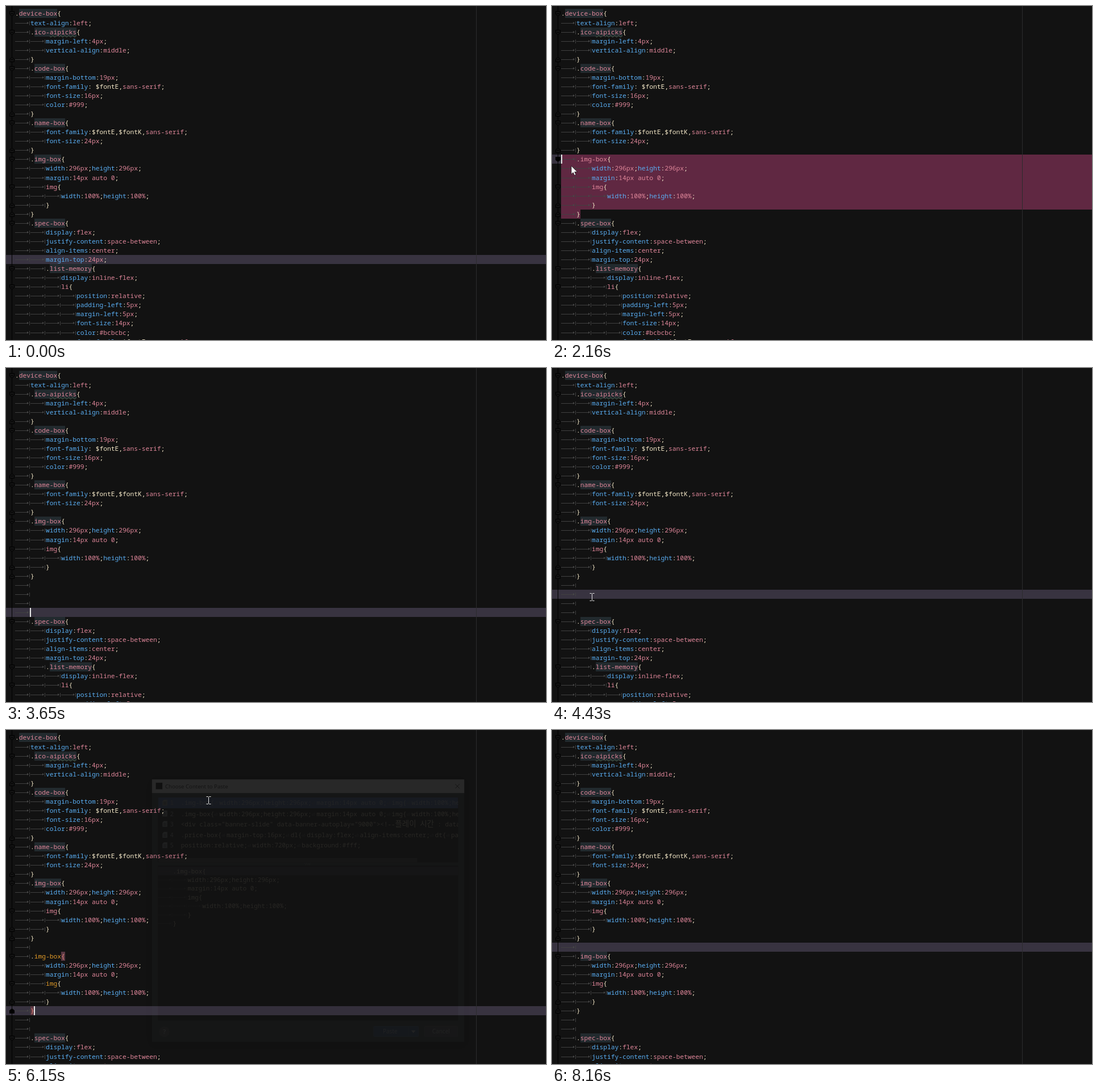
Write an HTML page that moves like this. It is 950x589 px and loops after 8.41 s.

```html
<!DOCTYPE html>
<html lang="en">
<head>
<meta charset="utf-8">
<title>Paste from history</title>
<style>
html, body { margin: 0; width: 100%; height: 100%; overflow: hidden; background: #121212; }
#stage { position: relative; width: 950px; height: 589px; overflow: hidden; background: #121212;
  font: 11.25px/16px "Noto Sans Mono", "DejaVu Sans Mono", monospace; color: #f4e8c8; }
#stage div, #stage svg { position: absolute; }
.row { left: 16px; height: 16px; white-space: pre; }
.band { left: 0; width: 950px; height: 16px; background: #383340; }
.sel { left: 16px; background: #602842; }
.caret { width: 2px; height: 16px; background: #e8e8e8; }
.rail { left: 10px; top: 0; width: 1px; height: 589px; background: #000; }
.guide { left: 827px; top: 0; width: 1px; height: 589px; background: #2c2c2d; }
.fold { left: 5px; width: 11px; height: 11px; fill: #121212; stroke: #000; }
.fold.on { fill: #000; }
.tab { display: inline-block; position: relative; width: 27px; height: 16px; vertical-align: top;
  background: linear-gradient(#404040, #404040) 0 8px / 23px 1px no-repeat,
    linear-gradient(#404040, #404040) 25px 5px / 1px 7px no-repeat; }
.tab::after { content: ""; position: absolute; left: 21px; top: 6px;
  border: solid transparent; border-width: 2.5px 0 2.5px 3px; border-left-color: #484848; }
.prop { color: #5aaef2; }
.val, .name { color: #de8699; }
.box { display: inline-block; height: 16px; vertical-align: top; background: #222a2e; }
.typo { text-decoration: underline wavy #4d6650 1px; text-underline-offset: 1px; }
.new { color: #e09a28; }
.brace { display: inline-block; height: 16px; vertical-align: top; background: #593842; color: #ee8a80; }

#dialog { left: 246px; top: 78px; width: 571px; height: 481px; background: #3c3f41;
  box-shadow: 0 4px 14px rgba(0, 0, 0, .55); }
#dialog .title { left: 0; top: 0; width: 571px; height: 25px; background: #fff; color: #111;
  font: 10px/25px "Open Sans", "Noto Sans", sans-serif; text-indent: 24px; }
.badge { left: 7px; top: 6px; width: 12px; height: 12px; background: #000; }
.list, .preview { left: 11px; width: 549px; overflow: hidden; background: #121212; }
.list { top: 33px; height: 119px; }
.preview { top: 158px; height: 284px; }
.item { left: 0; width: 549px; height: 19.5px; line-height: 19.5px; white-space: pre; }
.item.on { background: #4b6eaf; color: #c4cbd8; }
.item .num { left: 22px; color: #a4a8ac; }
.item .text { left: 42px; }
.item svg { left: 8px; top: 4px; }
.ret { display: inline-block; width: 9.2px; font: 8px/16px "DejaVu Sans", sans-serif; color: #858585; }
.ko { font: 14px/16px "Noto Sans CJK KR", "Noto Sans CJK", sans-serif; }
.bar { left: 1px; top: 111px; width: 473px; height: 8px; background: #414141; }
.grip { left: 279px; top: 153px; width: 12px; height: 4px;
  background: repeating-linear-gradient(115deg, #777 0 1px, transparent 1px 3px); }
.preview .band { top: 2px; width: 549px; }
.preview .row { left: 0; }
.help, .btn { box-sizing: border-box; font: 10.5px/19px "Open Sans", "Noto Sans", sans-serif; color: #bfc3c6; text-align: center; }
.help { left: 13px; top: 453px; width: 19px; height: 19px; border-radius: 50%; background: #55595c; font-size: 12px; font-weight: 600; }
.btn { top: 452px; height: 20px; border: 1px solid #5e6162; border-radius: 2px; background: #4c5052; }
.btn.main { left: 405px; width: 83px; border-color: #4c708c; background: #365880; text-indent: -22px; }
.btn.main::before { content: ""; position: absolute; left: 62px; top: 0; width: 1px; height: 18px; background: #4c708c; }
.btn.main::after { content: ""; position: absolute; left: 68px; top: 7px;
  border: solid transparent; border-width: 5px 4.5px 0; border-top-color: #bfc3c6; }
#arrow, #beam { overflow: visible; left: 0; top: 0; }
</style>
</head>
<body>
<div id="stage">
  <div id="code"></div>
  <div class="guide"></div>
  <div id="dialog">
    <div class="title">Choose Content to Paste</div>
    <div class="badge"></div>
    <svg style="left:554px;top:8px" width="9" height="9" stroke="#222" fill="none"><path d="M.5 .5l8 8M8.5 .5l-8 8"/></svg>
    <div class="list" id="list"></div>
    <div class="grip"></div>
    <div class="preview" id="preview"><div class="band"></div></div>
    <div class="help">?</div>
    <div class="btn main">Paste</div>
    <div class="btn" style="left:498px;width:61px">Cancel</div>
  </div>
  <svg id="arrow" width="12" height="18"><path d="M0 0V14.5L3.3 11.5L5.6 16.6L8 15.5L5.7 10.6H10.4Z" fill="#fff" stroke="#111" stroke-width=".7"/></svg>
  <svg id="beam" width="9" height="14" fill="none"><path d="M.5 .5h3l1 1l1-1h3M4.5 1.5v11M.5 13.5h3l1-1l1 1h3" stroke="#e4e4e4"/></svg>
</div>
<script>
const LOOP = 8410, CHAR = 6.75, LEFT = 16;
const $ = id => document.getElementById(id);
const rowTop = i => Math.round(5.45 + 16.06 * i);

// One leading space is one tab.
const imgBox = ` .img-box{
  width:296px;height:296px;
  margin:14px auto 0;
  img{
   width:100%;height:100%;
  }
 }`.split("\n");
const head = `.device-box{
 text-align:left;
 .ico-aipicks{
  margin-left:4px;
  vertical-align:middle;
 }
 .code-box{
  margin-bottom:19px;
  font-family: $fontE,sans-serif;
  font-size:16px;
  color:#999;
 }
 .name-box{
  font-family:$fontE,$fontK,sans-serif;
  font-size:24px;
 }`.split("\n").concat(imgBox);
const tail = ` .spec-box{
  display:flex;
  justify-content:space-between;
  align-items:center;
  margin-top:24px;
  .list-memory{
   display:inline-flex;
   li{
    position:relative;
    padding-left:5px;
    margin-left:5px;
    font-size:14px;
    color:#bcbcbc;
    font-family:$fontE,sans-serif;`.split("\n");

const span = (cls, text) => `<span class="${cls}">${text}</span>`;
const tabs = line => span("tab", "").repeat(line.search(/\S|$/));

function paint(line, { plain, fresh, lit }) {
  const text = line.trimStart();
  const brace = c => lit ? span("brace", c) : c;
  let html;
  if (text.endsWith("{")) {
    const [, dot, name] = text.match(/(\.?)(.*)\{/);
    const cls = fresh ? "new" : dot && !plain ? "name box" : "name";
    html = dot + span(cls, name.replace("aipicks", span("typo", "aipicks"))) + brace("{");
  } else if (text === "}") {
    html = brace("}");
  } else {
    html = text.replace(/([\w-]+):([^;]*);/g, (m, prop, value) =>
      span("prop", prop) + ":" + value.replace(/(^|[ ,])([^$ ,][^,]*)/g, (n, sep, v) => sep + span("val", v)) + ";");
  }
  return tabs(line) + html;
}

function foldMark(line, i, on) {
  const end = line.slice(-1);
  if (end !== "{" && end !== "}") return "";
  const d = end === "{" ? "M1.5 1.5h8v5l-4 3l-4-3z" : "M1.5 9.5h8v-5l-4-3l-4 3z";
  return `<svg class="fold${on ? " on" : ""}" style="top:${rowTop(i) + 3}px"><path d="${d}M3.5 5.5h4"/></svg>`;
}

// Each step changes part of the state: row and col of the caret, top row of
// the selection, matched braces, blank lines, pasted block, dialog look.
const steps = [
  [0, { row: 27, col: -1, sel: 0, lit: [], blank: 0, pasted: false, fresh: false, dialog: [0, 1] }],
  [510, { row: 22, col: 5, lit: [16, 22] }],
  [650, { row: 21, col: 0, sel: 21, lit: [] }],
  [740, { row: 20, sel: 20 }],
  [840, { row: 19, sel: 19 }],
  [990, { row: 18, sel: 18 }],
  [1220, { row: 17, sel: 17 }],
  [1540, { row: 16, sel: 16 }],
  [2700, { row: 22, col: 5, sel: 0, lit: [16, 22] }],
  [3090, { row: 23, col: 4, blank: 1, lit: [] }],
  [3330, { row: 24, blank: 2 }],
  [3500, { row: 25, blank: 3 }],
  [3650, { row: 26, blank: 4 }],
  [3820, { row: 24 }],
  [4430, { col: -1 }],
  [4960, { dialog: [.35, .95] }],
  [5040, { dialog: [.8, .985] }],
  [5110, { dialog: [1, 1] }],
  [6060, { row: 30, col: 5, pasted: true, fresh: true, lit: [24, 30], dialog: [.5, .982] }],
  [6150, { dialog: [.09, .962] }],
  [6230, { dialog: [0, 1] }],
  [6460, { fresh: false }],
  [6760, { row: 23, col: 4, lit: [] }],
  [8160, { col: -1 }]
];

// kind, start, end, from, to
const moves = [
  ["beam", 130, 510, [300, 440], [52, 366]],
  ["beam", 510, 910, [52, 366], [24, 337]],
  ["beam", 910, 1050, [24, 337], [24, 337]],
  ["arrow", 2160, 2250, [34, 282], [34, 282]],
  ["arrow", 2250, 2700, [34, 282], [53, 356]],
  ["beam", 2700, 2780, [53, 366], [53, 366]],
  ["beam", 3970, 4890, [70, 404], [70, 404]],
  ["arrow", 4890, 5190, [70, 404], [366, 228]],
  ["arrow", 5190, 5270, [366, 228], [366, 228]],
  ["arrow", 5270, 5590, [366, 228], [350, 117]],
  ["arrow", 5590, 5760, [350, 117], [350, 117]],
  ["arrow", 5760, 5910, [350, 117], [356, 118]],
  ["arrow", 5910, 6060, [356, 118], [356, 118]],
  ["beam", 6060, 6380, [356, 124], [356, 124]],
  ["beam", 6380, 6760, [356, 124], [310, 383]],
  ["beam", 6760, 6910, [310, 383], [310, 383]],
  ["beam", 6910, 7080, [400, 430], [636, 533]]
];

function drawCode(s) {
  const blanks = Array(s.blank).fill(" ");
  if (s.pasted) blanks.splice(1, 1, ...imgBox);
  const lines = [...head, ...blanks, ...tail].slice(0, 37);
  let html = `<div class="band" style="top:${rowTop(s.row)}px"></div><div class="rail"></div>`;
  if (s.sel) {
    const top = rowTop(s.sel), last = rowTop(22);
    html += `<div class="sel" style="top:${top}px;height:${last - top}px;width:934px"></div>` +
      `<div class="sel" style="top:${last}px;height:16px;width:34px"></div>`;
  }
  lines.forEach((line, i) => {
    const look = {
      plain: s.sel && i >= s.sel && i <= 22,
      fresh: s.fresh && i >= 24 && i <= 30,
      lit: s.lit.includes(i)
    };
    html += foldMark(line, i, i === s.row) + `<div class="row" style="top:${rowTop(i)}px">${paint(line, look)}</div>`;
  });
  if (s.col >= 0) {
    const x = Math.max(LEFT, Math.floor(LEFT - .5 + CHAR * s.col));
    html += `<div class="caret" style="left:${x}px;top:${rowTop(s.row)}px"></div>`;
  }
  $("code").innerHTML = html;
}

function buildDialog() {
  const flat = imgBox.map(line => line.trim()).join("~");
  const clips = [
    flat, flat,
    '<div class="banner-slide" data-banner-autoplay="9000"><!--플레이 시간 : data-banner',
    ".price-box{~margin-top:16px;~dl{~display:flex;~align-items:center;~dt{~padding:0;",
    "position:relative;~width:720px;~background:#fff;"
  ];
  const page = '<svg width="10" height="12"><path d="M3 0H9V11H0V3Z" fill="#9a9ea2"/><path d="M2 4.5h5M2 6.5h5M2 8.5h5" stroke="#454a50"/></svg>';
  $("list").innerHTML = clips.map((clip, i) => {
    const text = clip.replace(/</g, "&lt;")
      .replace(/[가-힣]+/g, m => span("ko", m))
      .replace(/~/g, span("ret", "⏎"));
    return `<div class="item${i ? "" : " on"}" style="top:${i * 19.5}px">${page}<div class="num">${i + 1}</div><div class="text">${text}</div></div>`;
  }).join("") + '<div class="bar"></div>';
  $("preview").innerHTML += imgBox.map((line, i) =>
    `<div class="row" style="top:${Math.round(2 + 16.06 * i)}px">${tabs(line)}${line.trim()}</div>`).join("");
}

function drawMouse(t) {
  const move = moves.find(m => t >= m[1] && t < m[2]);
  for (const kind of ["arrow", "beam"]) $(kind).style.display = move && move[0] === kind ? "block" : "none";
  if (!move) return;
  const [kind, start, end, from, to] = move;
  const p = Math.floor((t - start) / 80) * 80 / (end - start);
  const [x, y] = from.map((v, i) => Math.round(v + (to[i] - v) * p));
  $(kind).style.transform = kind === "beam" ? `translate(${x - 4}px,${y - 7}px)` : `translate(${x}px,${y}px)`;
}

let shown = -1;
function frame(now) {
  const t = (now - begin + LOOP) % LOOP;
  const past = steps.filter(step => step[0] <= t);
  if (past.length !== shown) {
    shown = past.length;
    const state = Object.assign({}, ...past.map(step => step[1]));
    const [opacity, scale] = state.dialog;
    drawCode(state);
    $("dialog").style.opacity = opacity;
    $("dialog").style.transform = `scale(${scale})`;
  }
  drawMouse(t);
  requestAnimationFrame(frame);
}

buildDialog();
const begin = performance.now();
frame(begin);
</script>
</body>
</html>
```
